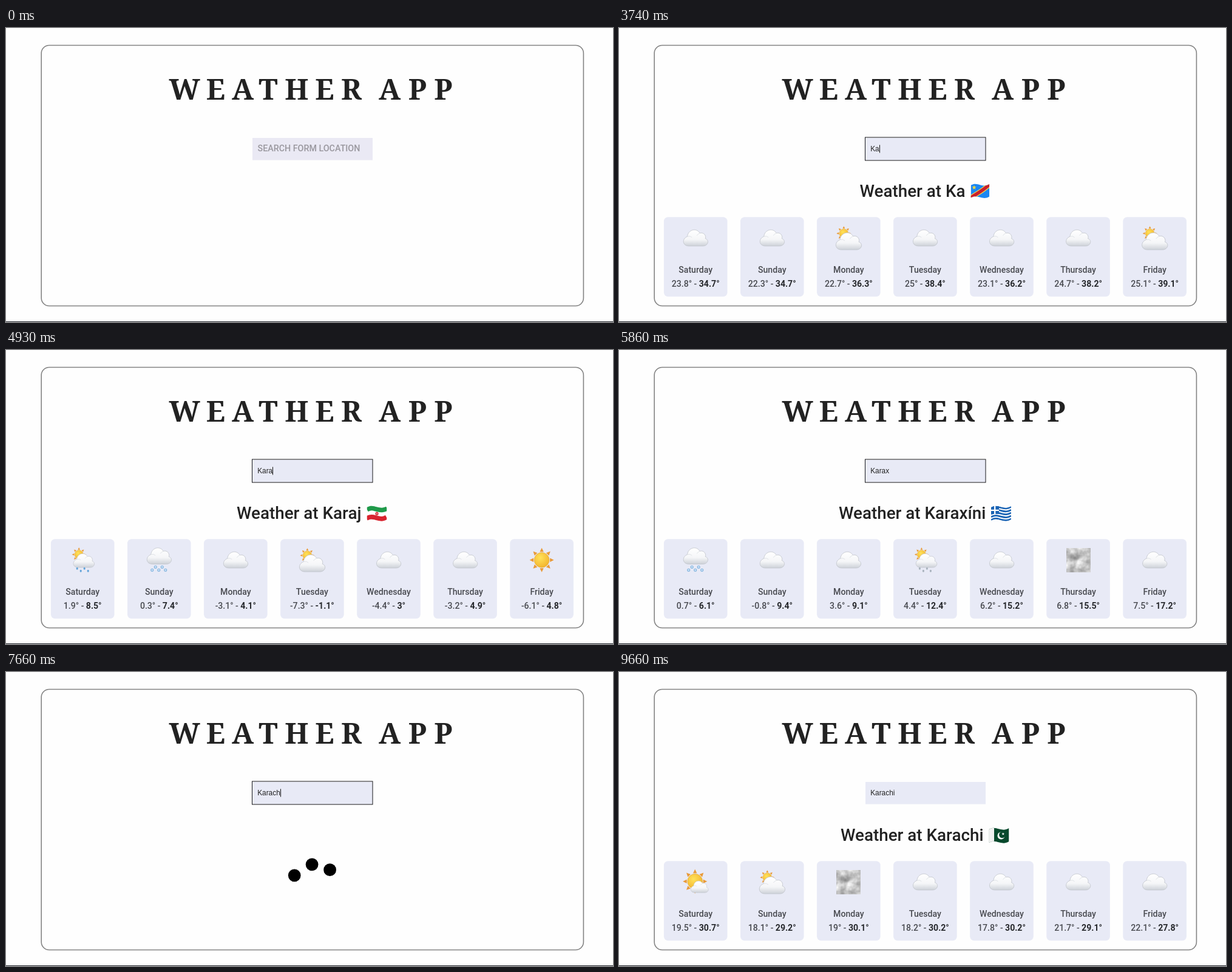
These frames come from a looping animation (1000 by 484 pixels, 9.76 s). An HTML page:

```html
<!DOCTYPE html>
<html lang="en">
<head>
<meta charset="utf-8">
<title>Weather App</title>
<style>
html, body { margin: 0; width: 100%; height: 100%; overflow: hidden; background: #fefefe; }
svg { display: block; width: 100vw; height: 100vh; }
.title { font: 700 48px "Noto Serif", serif; fill: #222; text-anchor: middle; }
.hint { font: 500 14.3px Roboto, sans-serif; fill: #9a989f; }
.typed { font: 11.85px "Liberation Sans", sans-serif; fill: #222; }
.head { font: 500 27.8px Roboto, sans-serif; fill: #222; }
.card { font: 500 14.1px Roboto, sans-serif; fill: #484a50; text-anchor: middle; }
.card .high { font-weight: 700; fill: #26282c; }
</style>
</head>
<body>
<svg viewBox="0 0 1000 484" preserveAspectRatio="none">
  <defs>
    <linearGradient id="puff" x1="0" y1="0" x2="0" y2="1">
      <stop offset="0" stop-color="#fff"/><stop offset=".6" stop-color="#f5f6f8"/><stop offset="1" stop-color="#cdd1d8"/>
    </linearGradient>
    <radialGradient id="glow" cx=".4" cy=".35" r=".7">
      <stop offset="0" stop-color="#ffe25a"/><stop offset="1" stop-color="#f3b32b"/>
    </radialGradient>
    <filter id="mist" x="0" y="0" width="1" height="1" color-interpolation-filters="sRGB">
      <feTurbulence type="fractalNoise" baseFrequency=".07" numOctaves="3" seed="4"/>
      <feColorMatrix values=".7 0 0 0 .43  .7 0 0 0 .43  .7 0 0 0 .43  0 0 0 0 1"/>
    </filter>
    <clipPath id="cloth"><path id="clothShape"/></clipPath>
  </defs>
  <rect width="1000" height="484" fill="#fefefe"/>
  <rect x="58.2" y="28.5" width="893.2" height="429" rx="13" fill="none" stroke="#838383" stroke-width="1.6"/>
  <rect y="483" width="1000" height="1" fill="#20242b"/>
  <text class="title" y="118" x="294 345.5 390 432 479 525 569 600 632 678 720.5">WEATHER APP</text>
  <rect id="field" x="406" y="181" width="198" height="36.5"/>
  <rect id="border" x="405.5" y="180" width="198.5" height="38" fill="none" stroke="#16161a"/>
  <text id="hint" class="hint" x="414.5" y="203">SEARCH FORM LOCATION</text>
  <text id="typed" class="typed" x="414.2" y="203"></text>
  <rect id="caret" y="192.5" width="1" height="13" fill="#111"/>
  <path id="beam" d="M473 184.5H475L475.5 185L476 184.5H478.5M473 198.5H475L475.5 198L476 198.5H478.5M475.5 185V198" fill="none" stroke="#44444a"/>
  <g id="dots"></g>
  <g id="result"></g>
</svg>
<script>
const LOOP = 9760, FOCUS = 1690, BLUR = 9340, BEAM_OFF = 3110;
const DAYS = ['Saturday', 'Sunday', 'Monday', 'Tuesday', 'Wednesday', 'Thursday', 'Friday'];
const $ = id => document.getElementById(id);
const show = (id, on) => $(id).setAttribute('visibility', on ? 'visible' : 'hidden');

// ---- weather icons, centred on 0,0 ----
const at = (x, y, s, body) => `<g transform="translate(${x} ${y}) scale(${s})">${body}</g>`;
const cloud = `<path d="M-11 13.2C-22 13.2-23 1-13.5-2.5C-13-13 1-18 7-8C14-10 18-3 16 1C23 3 21 13.2 12 13.2Z" fill="url(#puff)" stroke="#c0c4cb" stroke-width=".8"/>`
  + `<path d="M-13.5-2.5Q-9-4-6-1M7-8Q4-7 2-4" fill="none" stroke="#dde0e5" stroke-width=".9"/>`;
const ray = i => `<path d="M-3.2-13.5L0-20L3.2-13.5Z" transform="rotate(${i * 45})"/>`;
const sun = `<g fill="#e99a38">${[...Array(8).keys()].map(ray).join('')}</g>`
  + `<circle r="12.3" fill="url(#glow)" stroke="#e9ac35" stroke-width=".8"/>`;
const drops = color => [-9, -3, 3, 9].map((x, i) =>
  `<ellipse cx="${x}" cy="${14 + i % 2 * 4}" rx="1.6" ry="2" fill="${color}"/>`).join('');
const flakes = [-13, -7.5, -2, 3.5, 9].map((x, i) =>
  `<circle cx="${x + 1.5}" cy="${16.5 - i % 2 * 5}" r="2" fill="#d3e6f7" stroke="#7fb2de" stroke-width="1.1"/>`).join('');
const shower = color => at(-6, -9, .58, sun) + at(2, 1, .86, cloud) + drops(color);

const ICONS = {
  cloud: at(0, 0, 1, cloud),
  partly: at(-8, -7.5, .6, sun) + at(0, 5.5, 1.05, cloud),
  shower: shower('#62a4da'),
  sleet: shower('#a9b3bd'),
  snow: at(0, -6.5, 1, cloud) + flakes,
  sun,
  fair: at(-1, -1, 1, sun) + at(6.5, 8, .72, cloud),
  fog: '<rect x="-19.5" y="-19.5" width="39" height="39" filter="url(#mist)"/>'
};

// ---- flags on a waving cloth, 33 by 24 ----
const bend = y => `0 ${y + 2}C7 ${y - 2} 11 ${y} 17 ${y + 1.5}S27 ${y + 3.5} 33 ${y}`;
const stripe = (y, w, color) => `<path d="M${bend(y + w / 2)}" fill="none" stroke="${color}" stroke-width="${w + .3}"/>`;
const ground = color => `<rect y="-3" width="34" height="32" fill="${color}"/>`;
const star = (x, y, r, color) => {
  const pts = [...Array(10).keys()].map(i => {
    const a = i * Math.PI / 5 - Math.PI / 2, k = i % 2 ? r * .4 : r;
    return (x + k * Math.cos(a)).toFixed(2) + ',' + (y + k * Math.sin(a)).toFixed(2);
  });
  return `<polygon points="${pts.join(' ')}" fill="${color}"/>`;
};
$('clothShape').setAttribute('d', `M${bend(0)}V22C27 25.5 23 25 17 23.5S7 20 0 24Z`);

const band = (color, w) => `<path d="M-1 25C10 17 20 13 34 0" fill="none" stroke="${color}" stroke-width="${w}"/>`;
const FLAGS = {
  congo: ground('#1b87f3') + band('#f4d545', 8.5) + band('#c81f2d', 6) + star(6, 6, 4.2, '#f9dc3c'),
  iran: ground('#fff') + stripe(-1, 8.5, '#1f9a4a') + stripe(14.5, 10, '#d8232e')
    + '<circle cx="16.5" cy="12.5" r="2" fill="none" stroke="#d8232e" stroke-width="1.3"/><path d="M16.5 9.5V15" stroke="#d8232e"/>',
  greece: ground('#fff') + [0, 2, 4, 6, 8].map(i => stripe(i * 2.45, 2.45, '#1a63b4')).join('')
    + '<path d="M0 0H13V13H0Z" fill="#1a63b4"/><path d="M6.2 0V13M0 6.8H13" stroke="#fff" stroke-width="2.3"/>',
  pakistan: ground('#08492d') + '<rect y="-3" width="8.5" height="32" fill="#f1f1f1"/>'
    + '<circle cx="20" cy="12.5" r="6" fill="#fff"/><circle cx="21.8" cy="11" r="5.2" fill="#08492d"/>' + star(23.3, 9.6, 2.5, '#fff')
};

const PLACES = {
  ka: { name: 'Ka', x: 396.5, flag: ['congo', 579.5, .93],
    sky: 'cloud cloud partly cloud cloud cloud partly',
    temps: '23.8 34.7 22.3 34.7 22.7 36.3 25 38.4 23.1 36.2 24.7 38.2 25.1 39.1' },
  karaj: { name: 'Karaj', x: 380, flag: ['iran', 594.5, 1],
    sky: 'shower snow cloud partly cloud cloud sun',
    temps: '1.9 8.5 0.3 7.4 -3.1 4.1 -7.3 -1.1 -4.4 3 -3.2 4.9 -6.1 4.8' },
  karaxini: { name: 'Karaxíni', x: 362, flag: ['greece', 613, 1],
    sky: 'snow cloud cloud sleet cloud fog cloud',
    temps: '0.7 6.1 -0.8 9.4 3.6 9.1 4.4 12.4 6.2 15.2 6.8 15.5 7.5 17.2' },
  karachi: { name: 'Karachi', x: 365, flag: ['pakistan', 609.5, 1],
    sky: 'fair partly fog cloud cloud cloud cloud',
    temps: '19.5 30.7 18.1 29.2 19 30.1 18.2 30.2 17.8 30.2 21.7 29.1 22.1 27.8' }
};

function forecast(place) {
  const sky = place.sky.split(' '), temps = place.temps.split(' ');
  const [flag, fx, scale] = place.flag;
  const cards = DAYS.map((day, i) => {
    const x = 126.2 + i * 126.07;
    return `<g class="card"><rect x="${x - 52.3}" y="311.2" width="104.6" height="131" rx="7" fill="#e8eaf6"/>
      ${at(x, 345.7, 1, ICONS[sky[i]])}
      <text x="${x}" y="402.5">${day}</text>
      <text x="${x}" y="426">${temps[2 * i]}° - <tspan class="high">${temps[2 * i + 1]}°</tspan></text></g>`;
  });
  return `<text class="head" x="${place.x}" y="278">Weather at ${place.name}</text>
    ${at(fx, 257, scale, `<g clip-path="url(#cloth)">${FLAGS[flag]}</g>`)}` + cards.join('');
}

// ---- timeline ----
const TYPING = [[0, ''], [1900, 'K'], [3110, 'Ka'], [4170, 'Kar'], [4500, 'Kara'], [5190, 'Karax'], [6070, 'Karaxh'],
  [7080, 'Karax'], [7180, 'Kara'], [7330, 'Karac'], [7450, 'Karach'], [8150, 'Karachi']];
const VIEWS = [[0, ''], [3280, 'load'], [3620, 'ka'], [4170, 'load'], [4850, 'karaj'], [5190, 'load'], [5650, 'karaxini'],
  [6070, 'load'], [6500, 'karaxini'], [7080, 'load'], [7830, 'karachi'], [8150, 'load'], [8650, 'karachi']];
const BLINKS = [FOCUS, 2010, 3280, 4170, 4500, 5190, 6070, 7080, 7450, 8150];
const last = (list, t) => list.filter(e => e[0] <= t).pop()[1];

$('dots').innerHTML = [475.2, 504.1, 533.6].map(x => `<circle cx="${x}" r="10.4"/>`).join('');
const dots = [...$('dots').children];
let shown = null;

function render(t) {
  const word = last(TYPING, t), view = last(VIEWS, t);
  const focus = t >= FOCUS && t < BLUR;
  const typed = $('typed');
  if (typed.textContent !== word) typed.textContent = word;
  $('field').setAttribute('fill', t < FOCUS ? '#eae9f4' : '#e8eaf6');
  show('border', focus);
  show('hint', !word);
  show('beam', t >= FOCUS && t < BEAM_OFF);

  const since = t - (BLINKS.filter(b => b <= t).pop() || 0);
  const width = word ? typed.getComputedTextLength() : 0;
  $('caret').setAttribute('x', Math.round(414.4 + width));
  show('caret', focus && since % 1000 < 500);

  show('dots', view === 'load');
  dots.forEach((dot, i) => {
    const angle = (t - 7660) / 650 * 2 * Math.PI + Math.PI / 3 - i * 2 * Math.PI / 3;
    dot.setAttribute('cy', (325.8 + 10.4 * Math.sin(angle)).toFixed(2));
  });

  if (view !== shown) {
    $('result').innerHTML = PLACES[view] ? forecast(PLACES[view]) : '';
    shown = view;
  }
}

const start = performance.now();
function tick(now) {
  render(Math.max(0, now - start) % LOOP);
  requestAnimationFrame(tick);
}
render(0);
requestAnimationFrame(tick);
</script>
</body>
</html>
```
